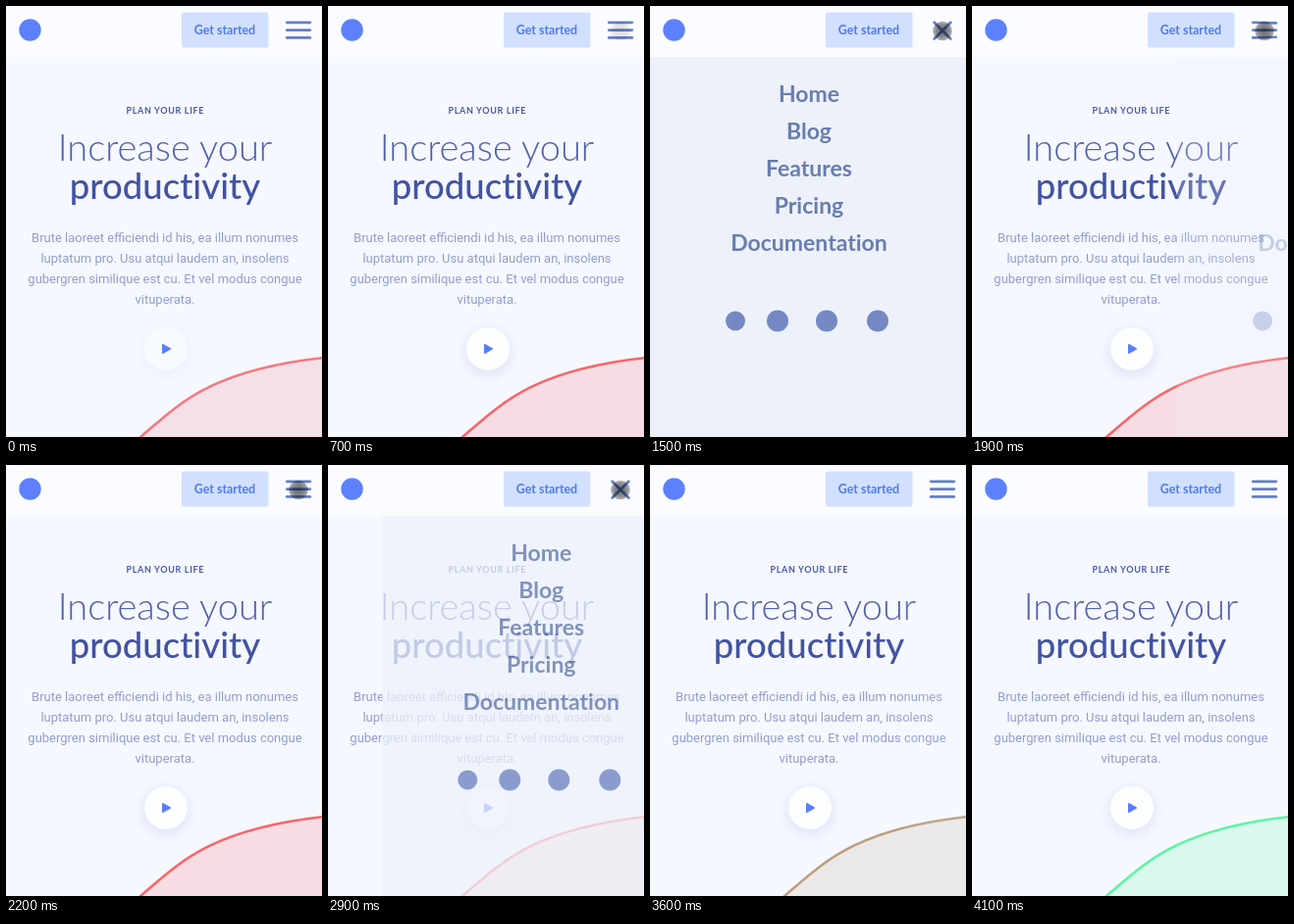
Write an HTML page that moves like this. It is 322 by 440 pixels and loops after 4.2 s.

```html
<!DOCTYPE html>
<html lang="en">
<head>
<meta charset="utf-8">
<title>Mobile menu</title>
<style>
  html, body { margin: 0; width: 100%; height: 100%; overflow: hidden; background: #f5f8ff; }
  svg { display: block; width: 100%; height: 100%; }
  text { text-anchor: middle; font-family: Lato, "Open Sans", sans-serif; font-variant-ligatures: none; }
  .label { font-size: 9px; font-weight: 700; letter-spacing: .68px; fill: #4a5aa5; }
  .light { font-size: 38px; font-weight: 300; fill: #5460a8; }
  .strong { font-size: 36.5px; font-weight: 500; fill: #4353a3; }
  .body text { font: 13px Roboto, sans-serif; fill: #939dcc; }
  .links text { font-size: 23px; font-weight: 700; fill: #697eae; }
  .cta { font-size: 12.4px; font-weight: 700; fill: #4f7af2; }
  #burger { stroke: #627fc6; stroke-width: 2.7; stroke-linecap: round; }
  #dot { mix-blend-mode: multiply; }
</style>
</head>
<body>
<svg viewBox="0 0 322 440">
  <defs>
    <radialGradient id="shade">
      <stop offset=".6" stop-color="#8fa3d8" stop-opacity=".16"/>
      <stop offset="1" stop-color="#8fa3d8" stop-opacity="0"/>
    </radialGradient>
    <radialGradient id="touch">
      <stop offset="0" stop-color="#6c6c6e"/>
      <stop offset=".65" stop-color="#8c8c8e"/>
      <stop offset="1" stop-color="#b8b8ba"/>
    </radialGradient>
  </defs>

  <rect width="322" height="440" fill="#f5f8ff"/>
  <text class="label" x="162.3" y="110">PLAN YOUR LIFE</text>
  <text class="light" x="162" y="158">Increase your</text>
  <text class="strong" x="162" y="197">productivity</text>
  <g class="body">
    <text x="162" y="241">Brute laoreet efficiendi id his, ea illum nonumes</text>
    <text x="162" y="262">luptatum pro. Usu atqui laudem an, insolens</text>
    <text x="162" y="283">gubergren similique est cu. Et vel modus congue</text>
    <text x="162" y="303.5">vituperata.</text>
  </g>

  <g id="hill">
    <path d="M133 443.5C175 408 205 372 324 359V444Z" fill="currentColor" fill-opacity=".18"/>
    <path d="M133 443.5C175 408 205 372 324 359" fill="none" stroke="currentColor" stroke-width="2.5"/>
  </g>

  <g id="disc">
    <circle cx="163" cy="354" r="32" fill="url(#shade)"/>
    <circle cx="163" cy="350" r="22" fill="#fdfeff"/>
  </g>
  <path d="M160 346L167 350L160 354Z" fill="#5b7dff" stroke="#5b7dff" stroke-width="2" stroke-linejoin="round"/>

  <g id="menu">
    <rect id="panel" y="52" width="322" height="388" fill="#edf1fa"/>
    <g class="links">
      <text x="162" y="98">Home</text>
      <text x="162" y="136">Blog</text>
      <text x="162" y="174">Features</text>
      <text x="162" y="212">Pricing</text>
      <text x="162" y="250">Documentation</text>
    </g>
    <g fill="#7489c4">
      <circle cx="87" cy="321.5" r="10"/>
      <circle cx="130" cy="321.5" r="11"/>
      <circle cx="180" cy="321.5" r="11"/>
      <circle cx="232" cy="321.5" r="11"/>
    </g>
  </g>

  <rect width="322" height="52" fill="#fafcff"/>
  <circle cx="24.5" cy="24.5" r="11.2" fill="#5d80ff"/>
  <rect x="179" y="6.5" width="88.5" height="36" rx="2" fill="#d1e0ff"/>
  <text class="cta" x="223" y="28.8">Get started</text>
  <g id="burger">
    <path d="M-11.8 0H11.8"/>
    <path d="M-11.8 0H11.8"/>
    <path d="M-11.8 0H11.8"/>
  </g>
  <circle id="dot" cx="298" cy="25.5" r="9.8" fill="url(#touch)"/>
</svg>
<script>
  const LOOP = 4200, WIDTH = 322, SLIDE = 400, MORPH = 200;
  const TOGGLES = [[1028, 1750], [2690, 3400]]; // [open, close] times
  const PINK = [246, 118, 127], RED = [253, 99, 103], GREEN = [91, 246, 160];

  const el = id => document.getElementById(id);
  const hill = el('hill'), disc = el('disc'), menu = el('menu'), panel = el('panel'), dot = el('dot');
  const bars = [...el('burger').children];

  const ramp = (t, start, length) => Math.min(1, Math.max(0, (t - start) / length));
  const mix = (a, b, k) => a.map((v, i) => v + (b[i] - v) * k);
  const cubic = (a, b, s) => 3 * a * s * (1 - s) ** 2 + 3 * b * s * s * (1 - s) + s ** 3;

  // cubic-bezier(.25, .1, .25, 1)
  function ease(x) {
    if (x <= 0 || x >= 1) return x;
    let low = 0, high = 1;
    for (let i = 0; i < 24; i++) {
      const mid = (low + high) / 2;
      if (cubic(.25, .25, mid) < x) low = mid; else high = mid;
    }
    return cubic(.1, 1, low);
  }

  const openness = (t, length) => TOGGLES.reduce((sum, [open, close]) =>
    sum + ease(ramp(t, open, length)) - ease(ramp(t, close, length)), 0);

  function draw(t) {
    const slide = openness(t, SLIDE), cross = openness(t, MORPH);

    menu.setAttribute('transform', `translate(${(1 - slide) * WIDTH} 0)`);
    menu.setAttribute('opacity', slide);
    panel.setAttribute('opacity', Math.sqrt(Math.max(0, slide)));

    bars.forEach((bar, i) => {
      const side = i - 1;
      const y = 24.6 + side * 7.8 * (1 - cross) + .5 * cross;
      bar.setAttribute('transform', `translate(298 ${y}) rotate(${-side * 45 * cross})`);
      bar.setAttribute('opacity', side ? 1 : 1 - cross);
    });

    const warm = mix(PINK, RED, ramp(t, 0, 600));
    hill.style.color = `rgb(${mix(warm, GREEN, ramp(t, 3300, 750)).map(Math.round)})`;
    disc.setAttribute('opacity', .35 + .65 * ramp(t, 0, 600));
    dot.setAttribute('opacity', ramp(t, 650, 250) - ramp(t, 3300, 100));
  }

  function frame() {
    draw(performance.now() % LOOP);
    requestAnimationFrame(frame);
  }
  frame();
</script>
</body>
</html>
```
